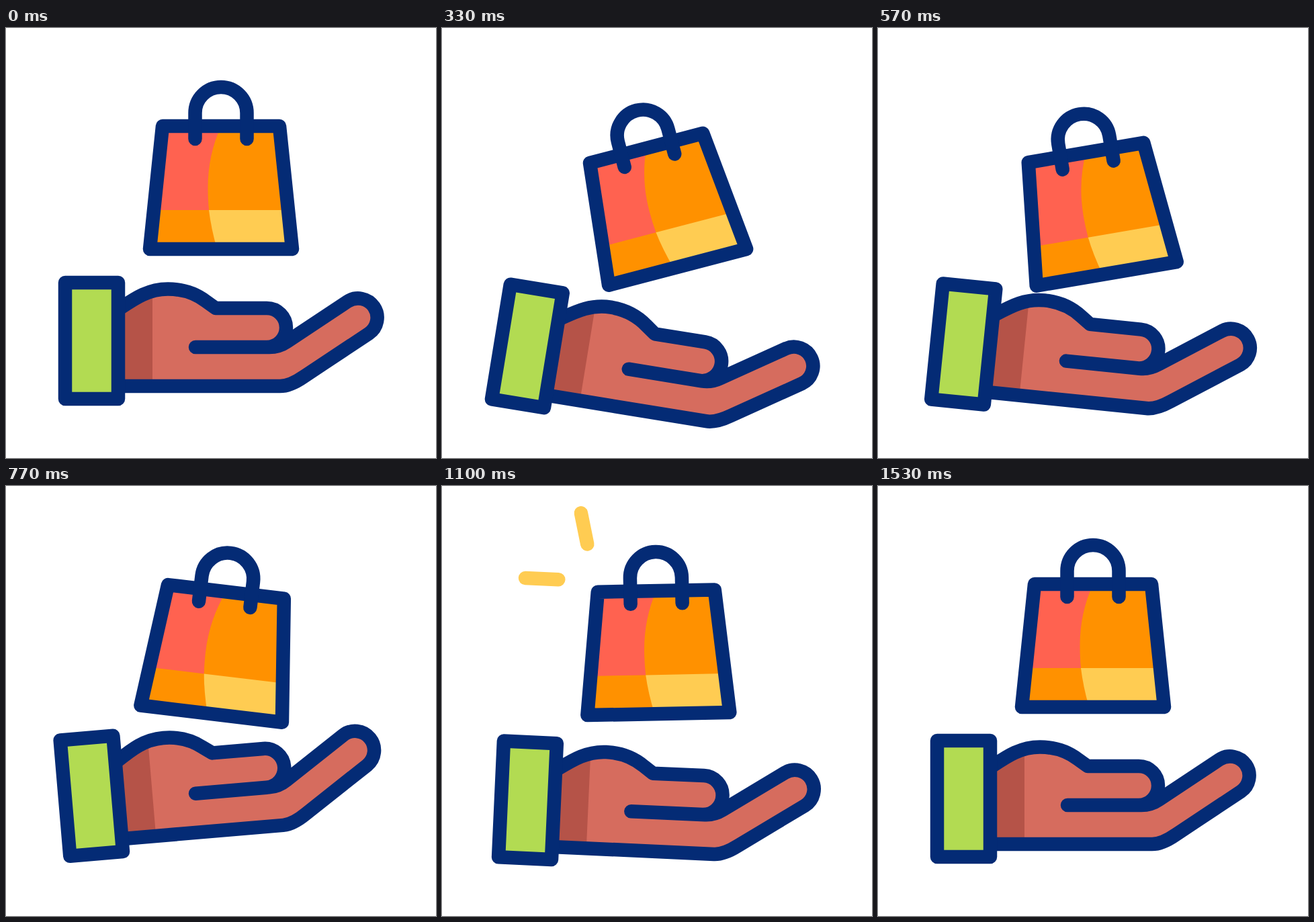
Write an HTML page that moves like this. It is 640 px wide and 640 px high and loops after 2 s.

```html
<!DOCTYPE html>
<html lang="en">
<head>
<meta charset="utf-8">
<title>Hand and shopping bag</title>
<style>
  html, body { margin: 0; width: 100%; height: 100%; overflow: hidden; background: #fff; }
  svg { display: block; width: 100vw; height: 100vh; }
  .line { stroke: #042b75; stroke-width: 20.5; stroke-linecap: round; stroke-linejoin: round; }
  .spark { stroke: #ffcc52; stroke-width: 20.5; stroke-linecap: round; }
</style>
</head>
<body>
<svg viewBox="0 0 640 640">
  <defs>
    <path id="palm" d="M167 419 C191 403 211 388.5 241 388.5 C266 388.5 285 397 298 407 L312 417 H388
      a29 29 0 0 1 0 58 H282 H392 C402 475 410 472.5 418 467 L508 407.3 A28.5 28.5 0 0 1 540 454.7
      L443 519.1 C433 526 421 533 408 533 H167"/>
    <clipPath id="inPalm"><use href="#palm"/></clipPath>
  </defs>

  <g id="hand">
    <use href="#palm" fill="#d66c5e"/>
    <rect x="160" y="380" width="58" height="160" fill="#b55348" clip-path="url(#inPalm)"/>
    <use href="#palm" class="line" fill="none"/>
    <rect class="line" x="88" y="379" width="79" height="173" fill="#b2db52"/>
  </g>

  <g id="bag">
    <path fill="#ff9100" d="M233 146 H407 L426 329 H214 Z"/>
    <path fill="#ff6250" d="M233 146 H320 C307 175 300.5 205 300.5 238 Q300.5 255 302 271 H220 Z"/>
    <path fill="#ffcc52" d="M302 271 Q305 297 314 329 H426 L420 271 Z"/>
    <path class="line" fill="none" d="M233 146 H407 L426 329 H214 Z"/>
    <path class="line" fill="none" d="M281.5 165 V126.5 a38.5 38.5 0 0 1 77 0 V165"/>
  </g>

  <line class="spark" id="sparkUp"/>
  <line class="spark" id="sparkLeft"/>
</svg>
<script>
const LOOP = 2000, FRAME = 1000 / 30;
const $ = id => document.getElementById(id);

// Keys are [frame, value] pairs at 30 frames per second.
const handTurn = [[0, 0], [13, 10.7], [23.8, -5.1], [33, 2.6], [42, -0.8], [46, 0]];
const bagTurn = [[0, 0], [13, -17], [24, 7.4], [37, -3.6], [46, 0]];
const bagDrop = [[0, 0], [15, 41.6], [27, 0.3], [38, 17.5], [46, 0]];
const sparkHead = [[26, 0], [35.3, 1]];
const sparkTail = [[29, 0], [41.5, 1]];
const sparks = [
  [$('sparkUp'), 220, 105, 204.5, 28.5],
  [$('sparkLeft'), 193, 140, 111.5, 136.5]
];

function valueAt(keys, f) {
  if (f <= keys[0][0]) return keys[0][1];
  for (let i = 1; i < keys.length; i++) {
    const [a, from] = keys[i - 1], [b, to] = keys[i];
    if (f < b) {
      const t = (f - a) / (b - a);
      return from + (to - from) * t * t * (3 - 2 * t);
    }
  }
  return keys[keys.length - 1][1];
}

function draw(f) {
  $('hand').setAttribute('transform', `rotate(${valueAt(handTurn, f)} 78 465.5)`);
  $('bag').setAttribute('transform',
    `translate(0 ${valueAt(bagDrop, f)}) rotate(${valueAt(bagTurn, f)} 320 208.5)`);

  const head = valueAt(sparkHead, f), tail = valueAt(sparkTail, f);
  for (const [el, x, y, endX, endY] of sparks) {
    el.setAttribute('visibility', head > tail ? 'visible' : 'hidden');
    el.setAttribute('x1', x + (endX - x) * tail);
    el.setAttribute('y1', y + (endY - y) * tail);
    el.setAttribute('x2', x + (endX - x) * head);
    el.setAttribute('y2', y + (endY - y) * head);
  }
}

const start = performance.now();
function tick() {
  const ms = (performance.now() - start) % LOOP;
  // The motion advances in whole frames.
  draw(Math.floor((ms + 3.4) / FRAME));
  requestAnimationFrame(tick);
}
tick();
</script>
</body>
</html>
```
